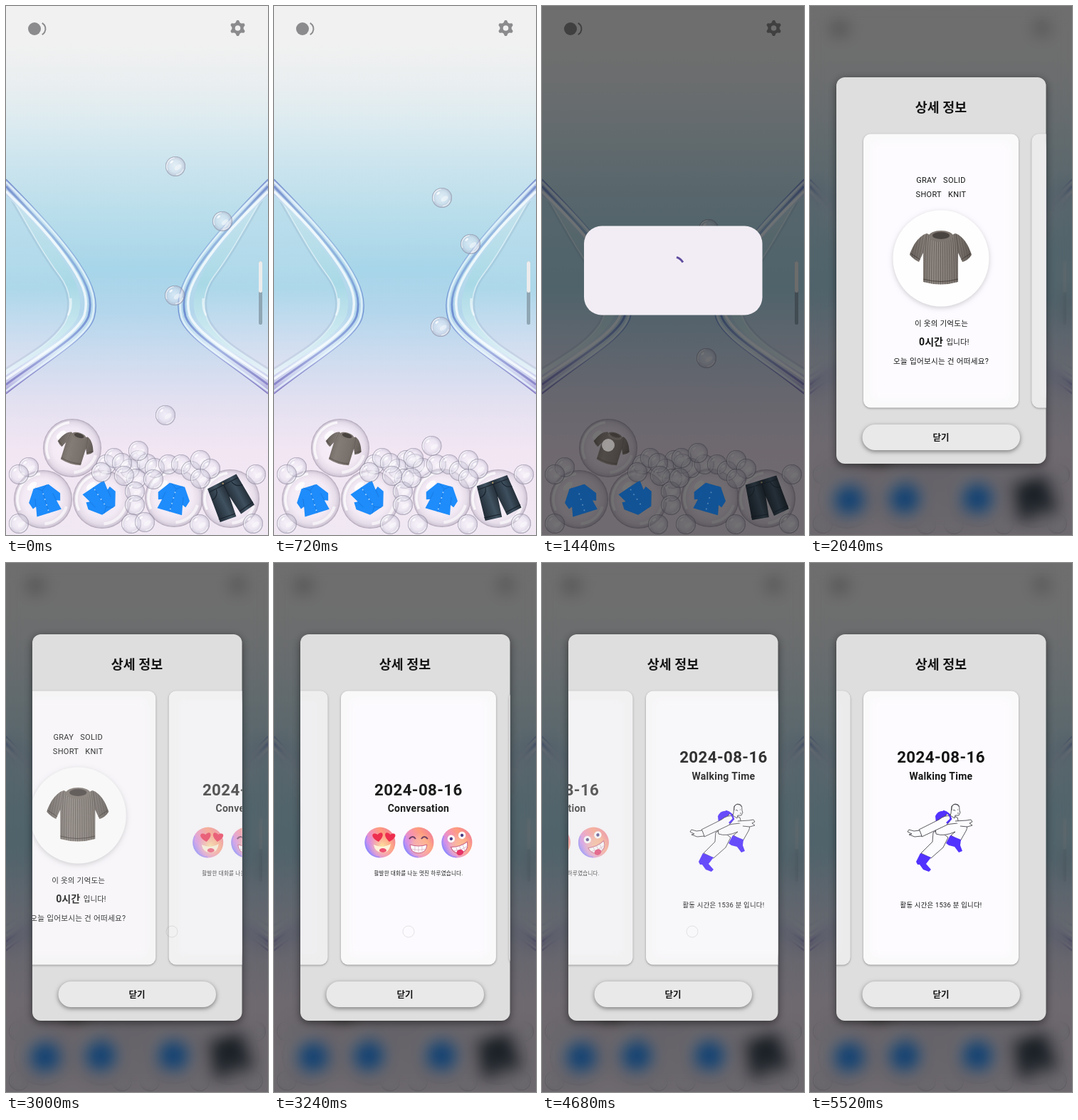
Write an HTML page with a canvas that moves like this. It is 368 px wide and 742 px high and loops after 5640 ms.

```html
<!DOCTYPE html>
<html lang="ko">
<head>
<meta charset="utf-8">
<style>
html, body { margin: 0; width: 100%; height: 100%; overflow: hidden; background: #eee; }
canvas { display: block; width: 368px; height: 742px; }
</style>
</head>
<body>
<canvas id="stage" width="368" height="742"></canvas>
<script>
const W = 368, H = 742, LOOP = 5640, STEP = 120, PITCH = 236.5;
const FONT = 'Roboto, "Noto Sans CJK KR", sans-serif';
const screen = document.getElementById('stage').getContext('2d');
let g = screen;

// ---------- helpers ----------
function gradient(x0, y0, x1, y1, stops) {
  const grad = g.createLinearGradient(x0, y0, x1, y1);
  stops.forEach(([at, color]) => grad.addColorStop(at, color));
  return grad;
}
function radial(x, y, r, stops, fx = x, fy = y) {
  const grad = g.createRadialGradient(fx, fy, 0, x, y, r);
  stops.forEach(([at, color]) => grad.addColorStop(at, color));
  return grad;
}
function shape(path, fill, stroke, width = 1) {
  const p = new Path2D(path);
  if (fill) { g.fillStyle = fill; g.fill(p); }
  if (stroke) { g.strokeStyle = stroke; g.lineWidth = width; g.stroke(p); }
}
function disc(x, y, rx, fill, ry = rx, turn = 0) {
  g.beginPath();
  g.ellipse(x, y, rx, ry, turn, 0, 7);
  g.fillStyle = fill;
  g.fill();
}
function arc(x, y, r, from, to, color, width) {
  g.beginPath();
  g.arc(x, y, r, from, to);
  g.strokeStyle = color;
  g.lineWidth = width;
  g.stroke();
}
function box(x, y, w, h, r, fill) {
  g.beginPath();
  g.roundRect(x, y, w, h, r);
  g.fillStyle = fill;
  g.fill();
}
function shadow(color, blur, dy, draw) {
  g.save();
  g.shadowColor = color;
  g.shadowBlur = blur;
  g.shadowOffsetY = dy;
  draw();
  g.restore();
}
function placed(x, y, scale, turn, draw) {
  g.save();
  g.translate(x, y);
  g.rotate(turn);
  g.scale(scale, scale);
  draw();
  g.restore();
}
function label(str, x, y, size, weight = 400, spacing = 0.25, align = 'center') {
  g.font = `${weight} ${size}px ${FONT}`;
  g.letterSpacing = spacing + 'px';
  g.textAlign = align;
  g.textBaseline = 'alphabetic';
  g.fillStyle = '#141414';
  g.fillText(str, x, y + size * 0.36);
}

// ---------- home scene ----------
const SKY = [[0, '#f2f1f2'], [.07, '#f1f1f1'], [.15, '#e9eef0'], [.22, '#dcebf0'], [.3, '#cbe4ee'],
  [.4, '#b8ddeb'], [.5, '#a7d5e9'], [.58, '#b4d6ec'], [.67, '#cfdcef'], [.76, '#e5e1f1'], [.84, '#f2e6f3'], [1, '#f0e8f3']];

function glass() {
  const outer = 'M0 243C38 281 80 325 104 362C124 392 130 415 124 437C115 467 60 496 0 544';
  const inner = 'C55 482 94 456 102 434C108 412 102 392 86 365C62 326 30 294 0 266Z';
  const film = 'M10 272C34 314 54 350 76 379C91 399 94 425 82 446C66 471 38 487 0 511';
  shape(film + 'L0 264Z', gradient(0, 280, 0, 512, [[0, '#bcdeec'], [.5, '#add8ea'], [.75, '#c8dcef'], [1, '#dfe2f1']]));
  shape(film, null, 'rgba(110,140,170,.16)', 7);
  shape(film + 'L0 518' + inner, gradient(0, 270, 0, 512, [[0, '#c8e4ee'], [.5, '#a9d9e6'], [.8, '#cfeaf1'], [1, '#e6f0f8']]));
  shape(film, null, 'rgba(225,243,249,.8)', 1.6);
  shape(outer + 'L0 518' + inner, gradient(0, 243, 0, 544,
    [[0, '#a5b8e2'], [.12, '#cbe3f2'], [.4, '#b5daec'], [.62, '#b3d6ec'], [.8, '#dcebf7'], [.93, '#cdd0ee'], [1, '#a9a0d8']]));
  const edge = gradient(0, 243, 0, 544, [[0, '#7189cc'], [.2, '#9cbce0'], [.45, '#86abdc'], [.62, '#6f90d2'], [.8, '#a3b2e2'], [1, '#8379c2']]);
  shape('M0 253C36 290 72 327 97 364C116 393 122 413 116 435C107 461 56 490 0 531', null, edge, 3);
  shape('M0 260C34 293 68 328 92 365C111 394 116 412 110 434C100 459 56 485 0 523', null, 'rgba(250,254,255,.8)', 3.5);
  shape('M0 247C38 285 78 326 102 363C122 393 127 415 121 437C112 466 60 494 0 540', null, 'rgba(232,245,252,.8)', 2.5);
  shape(outer, null, edge, 1.3);
  shape('M91 410C92 419 91 427 87 434', null, 'rgba(255,255,255,.55)', 3);
}

function bubble(x, y, r) {
  const big = r > 20;
  disc(x, y, r, radial(x, y, r, big
    ? [[0, 'rgba(252,247,253,.6)'], [.65, 'rgba(244,236,246,.65)'], [.86, 'rgba(226,217,230,.75)'], [.95, 'rgba(202,192,208,.75)'], [1, 'rgba(150,140,158,.75)']]
    : [[0, 'rgba(252,250,255,.5)'], [.6, 'rgba(232,230,242,.4)'], [.88, 'rgba(190,186,206,.45)'], [1, 'rgba(125,120,142,.7)']],
    x - r * .08, y - r * .1));
  arc(x, y, r * .88, 2.7, 4.6, 'rgba(255,255,255,.75)', r * .09);
  arc(x, y, r * .84, .3, 1.5, 'rgba(255,255,255,.6)', r * .1);
  disc(x - r * .38, y - r * .45, r * .2, 'rgba(255,255,255,.8)', r * .1, -.7);
  if (!big) disc(x + r * .25, y + r * .1, r * .4, 'rgba(255,255,255,.45)', r * .22, -.6);
}

function knit() {
  const body = 'M-20-35C-31-32-40-18-44-5Q-38 2-31 5L-25-8L-25 33Q0 40 24 33L24-8L30 5Q38 3 43-5C39-18 31-32 20-35Q0-24-20-35Z';
  shape(body, gradient(-40, 0, 40, 0, [[0, '#6f6863'], [.35, '#918983'], [.7, '#847c76'], [1, '#665f5a']]));
  g.save();
  g.clip(new Path2D(body));
  for (let x = -23; x < 26; x += 3.2) shape(`M${x * .85}-36Q${x}-10 ${x} 38`, null, 'rgba(66,60,56,.55)', .9);
  for (let i = 0; i < 5; i++) {
    const x = 27 + i * 3.5;
    shape(`M${x - 6}-33L${x}-1M${6 - x}-33L${-x}-1`, null, 'rgba(66,60,56,.45)', .8);
  }
  shape('M-25 29Q0 36 24 29M-44-8L-29 2M43-8L28 2', null, 'rgba(55,49,46,.7)', 1);
  g.restore();
  disc(0, -31, 17, '#7d756f', 8);
  disc(0, -32, 12, '#4a4441', 5);
}

function blueShirt() {
  shape('M-11-20L11-20L23-3L20 7L15 5L18 19L-18 19L-15 5L-20 7L-23-3Z', '#1e8cfb');
  shape('M-8-20L0-14L8-20M-15 5L-13-6M15 5L13-6M0-14L0 19', null, '#1778e0', .8);
  for (let y = -9; y < 18; y += 8) disc(0, y, 1, '#a9d4fc');
}

function shorts() {
  shape('M-21-24L21-24L24 22L3 25L0-2L-4 25L-26 22Z', gradient(-25, 0, 25, 0,
    [[0, '#222d38'], [.3, '#40515f'], [.5, '#26313b'], [.75, '#3e4f5e'], [1, '#1f2932']]));
  shape('M-21-19L21-19M0-20L0-2M-22-8Q-13-9-11-18M22-8Q13-9 11-18M-26 18L-4 21M3 21L24 18', null, '#18222c', 1);
  disc(0, -21, 1.2, '#a08b66');
}

const PILE = [32,647, 18,657, 18,726, 141,643, 152,634, 134,654, 186,637, 174,649, 163,641, 198,642, 183,663, 166,659,
  209,648, 228,643, 246,643, 260,652, 273,637, 287,649, 273,663, 351,657, 347,726, 272,727, 181,681, 181,700];
const DRIFTERS = [[186, 624, 10, 10], [176, 726, -13, 1], [195, 724, 7, 3], [207, 664, -14, -2]];
const FALLERS = [[238, 225, -2, 44], [304, 302, -28, 32], [237, 406, -3, 44]];

function clothes(t) {
  placed(97, 621, .6, .3, knit);
  placed(55, 693, 1, -.3, blueShirt);
  placed(133, 691, 1, 2.55, blueShirt);
  placed(235, 691, 1, .28, blueShirt);
  const roll = .22 * (1 - Math.exp(-t / 900));
  placed(315, 690, 1.08, -.47 + roll, shorts);
}

function gear(x, y) {
  g.beginPath();
  for (let i = 0; i < 24; i++) {
    const r = i % 4 < 2 ? 11 : 8.2;
    const a = (i - .5) * Math.PI / 12 + Math.PI / 2;
    g.lineTo(x + r * Math.cos(a), y + r * Math.sin(a));
  }
  g.closePath();
  g.moveTo(x + 3.8, y);
  g.arc(x, y, 3.8, 0, 7);
  g.fillStyle = '#8b8b8d';
  g.fill('evenodd');
}

function home(t) {
  const k = t / 720;
  g.fillStyle = gradient(0, 0, 0, H, SKY);
  g.fillRect(0, 0, W, H);
  glass();
  g.save();
  g.translate(W, 0);
  g.scale(-1, 1);
  glass();
  g.restore();

  disc(40, 32, 9, '#8b8b8d');
  arc(46, 32, 9.5, -1.05, 1.05, '#8b8b8d', 2);
  gear(325.5, 31);
  box(355, 358, 5, 89, 2.5, '#8fa6b4');
  box(355, 358, 5, 44, 2.5, '#ececec');

  for (const [x, y] of [[93, 620], [52, 692], [135, 692], [236, 690], [315, 691]]) bubble(x, y, 41);
  clothes(t);
  for (let i = 0; i < PILE.length; i += 2) bubble(PILE[i], PILE[i + 1], 14);
  const settle = Math.min(1, k);
  for (const [x, y, dx, dy] of DRIFTERS) bubble(x + dx * settle, y + dy * settle, 14);
  for (const [x, y, dx, dy] of FALLERS) bubble(x + dx * k, y + dy * k, 14);
  bubble(224 - 2.5 * k, 574 + Math.min(43 * k, 33 + 10 * k), 14);
}

function scrim(alpha) {
  g.fillStyle = `rgba(0,0,0,${alpha})`;
  g.fillRect(0, 0, W, H);
}

// ---------- loading ----------
function loading(t) {
  const first = t < 1440;
  scrim(first ? .28 : .54);
  if (!first) {
    g.globalAlpha = .25;
    clothes(t);
  }
  g.globalAlpha = 1;
  disc(93, 616, 9, 'rgba(255,255,255,.45)');
  g.globalAlpha = first ? .5 : 1;
  box(59, 308.5, 250.5, 125, 25, '#f2edf4');
  if (!first) {
    const turn = (t - 1440) / 120;
    arc(184, 367.5, 16, -1.25 + turn * .6, -.52 + turn * 1.6, '#5f4c9f', 3);
  }
  g.globalAlpha = 1;
}

// ---------- detail pages, drawn in resting position ----------
function knitPage() {
  label('GRAY   SOLID', 184, 244, 11, 400, .3);
  label('SHORT   KNIT', 184, 264, 11, 400, .3);
  shadow('rgba(0,0,0,.18)', 7, 2, () => disc(184, 354, 67.5, '#fefefe'));
  placed(184, 354, 1, 0, knit);
  label('이 옷의 기억도는', 184.5, 445, 10.5);
  label('0시간', 153, 471, 14, 700, .1, 'left');
  label('입니다!', 191.5, 471, 10.4, 400, .15, 'left');
  label('오늘 입어보시는 건 어떠세요?', 184, 498, 10.6);
}

function heart(x, y, turn) {
  placed(x, y, 1, turn, () => shape('M0 7C-12-1-7-9 0-3C7-9 12-1 0 7Z', '#ee2648'));
}
function ball(x, warm) {
  disc(x, 392, 21.5, gradient(x - 19, 404, x + 17, 380,
    [[0, '#8d8bff'], [.22, '#d58ce8'], [.48, '#f78fae'], [.75, '#ff9a78'], [1, '#f58390']]));
  disc(x, 392, 21.5, radial(x + 3, 397, 19, [[0, warm], [.55, 'rgba(255,205,150,.45)'], [1, 'rgba(255,190,160,0)']]));
  arc(x, 392, 20.5, 1.6, 3.6, 'rgba(135,130,255,.55)', 2);
}
function grin() {
  shape('M-12 3Q0 7 12 3Q11 15 0 15Q-11 15-12 3Z', '#fff', '#c9587f', 1);
  shape('M-11 9Q0 12 11 9M-5 5L-5 14M0 5L0 15M5 5L5 14', null, '#d6a8bd', .7);
}
function conversationPage(t) {
  label('2024-08-16', 184, 318, 22.3, 700, .4);
  label('Conversation', 184, 344, 14, 700, .25);

  ball(130, 'rgba(255,236,150,.9)');
  heart(127, 384, -.15);
  heart(144, 384, .15);
  shape('M121 395Q133 401 145 394Q143 407 133 406Q123 406 121 395Z', '#fff3d8');
  disc(134, 403, 5, '#ee4b6d', 3);

  ball(184, 'rgba(255,190,170,.7)');
  placed(184, 392, 1, 0, () => {
    shape('M-13-5Q-8-11-4-5M4-5Q8-11 13-5', null, '#6d3b60', 2);
    grin();
  });

  ball(238, 'rgba(255,205,140,.75)');
  placed(240, 392, 1, -.43 + .12 * Math.cos((t - 3240) / 960 * Math.PI), () => {
    for (const x of [-8, 8]) {
      disc(x, -8, 5.2, '#fff');
      disc(x, -8, 2.2, '#45367e');
    }
    grin();
    disc(-2, 14, 5, '#e62e63', 4);
  });
  label('활발한 대화를 나눈 멋진 하루였습니다.', 184, 435, 7.5);
}

function walkingPage() {
  const blue = '#5232ff', line = '#303036', white = '#fcfbfe';
  label('2024-08-16', 184, 272, 22.3, 700, .4);
  label('Walking Time', 184, 299, 14, 700, .25);
  g.lineJoin = 'round';
  // rear leg and boot
  shape('M180 374L194 385L187 399L170 414L156 407L172 391L173 378Z', white, line, .8);
  shape('M155 407L170 413L163 422L170 430L167 433L159 430L154 423L151 423L149 419Z', blue);
  // pack, torso, front leg
  shape('M176 355Q180 346 190 348L199 356L190 373L178 374Z', blue);
  shape('M193 351L207 357L209 365L199 376L178 380Q174 374 181 367Z', white, line, .8);
  shape('M176 372Q196 364 217 365Q223 369 219 376L211 390L198 382L204 377Q188 384 177 380Z', white, line, .8);
  shape('M197 382L212 388L211 396L214 404L209 406L203 398L195 396L191 393Z', blue);
  // arms and hands
  shape('M197 355Q190 353 181 360L153 374L157 384L191 368Q199 362 197 355Z', white, line, .8);
  shape('M154 375L146 376L139 374L137 377L143 380L139 381L147 384L157 383Z', white, line, .8);
  shape('M204 362L220 361L226 360L228 363L224 365L228 368L221 370L211 369', white, line, .8);
  shape('M187 348Q196 350 198 359L192 365', null, blue, 2.5);
  // head
  shape('M198 351L199 341Q202 337 207 339Q211 342 210 347L211 350L209 354L204 354L203 358L197 354Z', white, line, .8);
  shape('M199 347Q198 339 204 338Q209 338 210 342M201 347Q203 345 204 348M207 346L208 346M207 351L209 351', null, line, .8);
  label('활동 시간은 1536 분 입니다!', 184, 480, 9.4);
}

const PAGES = [knitPage, conversationPage, walkingPage];
const SWIPE = [.06, .35, .7, .92, .985];

function swiped(t, start) {
  const i = Math.floor((t - start) / STEP);
  return i < 0 ? 0 : SWIPE[i] ?? 1;
}

function page(draw, offset, t) {
  const fade = .5 * Math.min(1, Math.abs(offset) / PITCH);
  g.save();
  g.translate(offset, 0);
  shadow('rgba(0,0,0,.35)', 3, 1, () => box(75, 179.5, 218, 384, 10, '#fbfafb'));
  g.save();
  g.filter = 'blur(5px)';
  box(88, 192, 192, 358, 6, '#fdfbff');
  g.restore();
  draw(t);
  box(75, 179.5, 218, 384, 10, `rgba(222,222,222,${fade})`);
  g.restore();
}

function touch(t, start) {
  const i = (t - start) / STEP;
  if (i < 0 || i > 3) return;
  arc(189 + (3 - i) * 22, 517, 8, 0, 7, 'rgba(120,120,125,.18)', 1);
}

function detail(t) {
  g.drawImage(backdrop, 0, 0);
  shadow('rgba(0,0,0,.5)', 12, 3, () => box(37, 100, 294.5, 542, 12, '#dedede'));
  label('상세 정보', 184, 142, 18.4, 700, 0);
  g.save();
  g.beginPath();
  g.rect(37, 170, 294.5, 405);
  g.clip();
  const scroll = (swiped(t, 2880) + swiped(t, 4440)) * PITCH;
  PAGES.forEach((draw, i) => {
    const offset = i * PITCH - scroll;
    if (Math.abs(offset) < 270) page(draw, offset, t);
  });
  g.restore();
  touch(t, 2880);
  touch(t, 4440);
  shadow('rgba(0,0,0,.45)', 6, 2, () => box(73.5, 587, 221.5, 36, 18, '#e9e9e9'));
  label('닫기', 184, 605, 12.5, 700, 0);
}

// blurred, dimmed home scene behind the detail dialog
function layer(draw) {
  const canvas = document.createElement('canvas');
  canvas.width = W;
  canvas.height = H;
  g = canvas.getContext('2d');
  draw();
  g = screen;
  return canvas;
}
const dimmed = layer(() => { home(1680); scrim(.54); });
const backdrop = layer(() => {
  g.drawImage(dimmed, 0, 0);
  g.filter = 'blur(11px)';
  g.drawImage(dimmed, 0, 0);
});

function render(t) {
  if (t >= 1680) return detail(t);
  home(t);
  if (t >= 1320) loading(t);
}

let begin;
function tick(now) {
  begin ??= now;
  render(Math.floor((now - begin) % LOOP / STEP) * STEP);
  requestAnimationFrame(tick);
}
requestAnimationFrame(tick);
</script>
</body>
</html>
```
